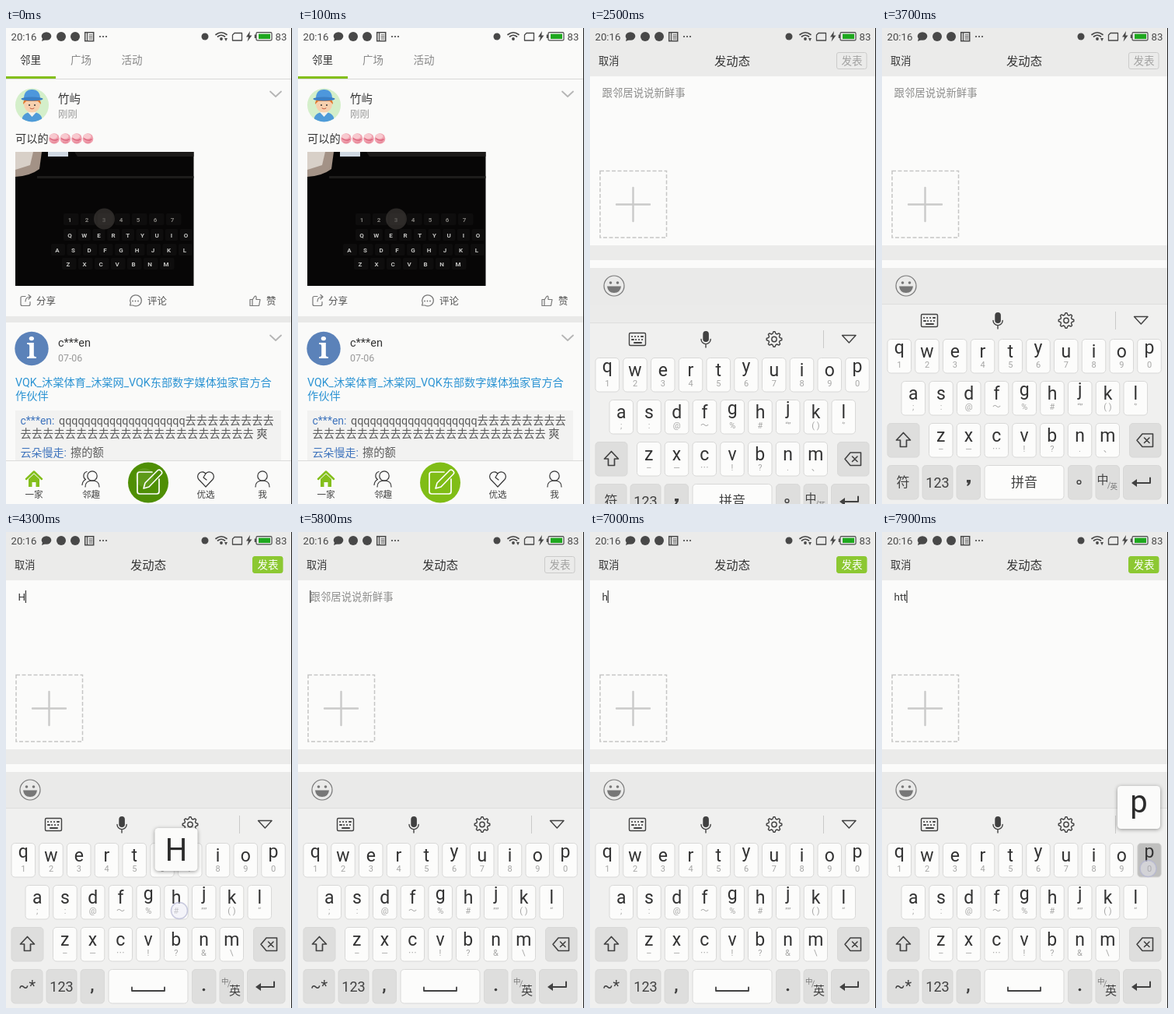
An HTML page that plays this animation: 368x611 px, repeating every 8000 ms.

```html
<!DOCTYPE html>
<html lang="zh-CN">
<head>
<meta charset="utf-8">
<title>发动态</title>
<style>
  html, body { margin: 0; width: 100%; height: 100%; overflow: hidden; background: #fafaf9; }
  svg { display: block; width: 368px; height: 611px; }
  text { font-family: Roboto, "Noto Sans CJK SC", "Noto Sans CJK", sans-serif; white-space: pre; }
</style>
</head>
<body>
<svg id="stage" viewBox="0 0 368 611"></svg>
<script>
const LOOP = 8000;
const INK = '#333', PAPER = '#fafaf9', GREY = '#ebebea', GREEN = '#84bf1c';
const stage = document.getElementById('stage');
const pen = document.createElement('canvas').getContext('2d');

// Drawing helpers
const text = (x, y, s, size, fill = INK, anchor = 'start', more = '') =>
  `<text x="${x}" y="${y}" font-size="${size}" fill="${fill}" text-anchor="${anchor}" ${more}>${s}</text>`;
const mid = (x, y, s, size, fill, more) => text(x, y, s, size, fill, 'middle', more);
const rect = (x, y, w, h, fill, more = '') =>
  `<rect x="${x}" y="${y}" width="${w}" height="${h}" fill="${fill}" ${more}/>`;
const dot = (x, y, r, fill, more = '') => `<circle cx="${x}" cy="${y}" r="${r}" fill="${fill}" ${more}/>`;
const line = (d, stroke = INK, width = 1.3, fill = 'none') =>
  `<path d="${d}" stroke="${stroke}" stroke-width="${width}" fill="${fill}" stroke-linejoin="round" stroke-linecap="round"/>`;
const shape = (d, fill) => `<path d="${d}" fill="${fill}"/>`;
const ring = (x, y, r, stroke = INK, width = 1.3) => dot(x, y, r, 'none', `stroke="${stroke}" stroke-width="${width}"`);
const measure = (s, size) => {
  pen.font = `${size}px Roboto, sans-serif`;
  return pen.measureText(s);
};
// Glyph whose lowest ink, descender included, rests on the given line
const glyph = (x, bottom, s, size, fill = INK) =>
  mid(x, bottom - Math.max(0, measure(s, size).actualBoundingBoxDescent), s, size, fill);

function statusBar(s) {
  const c = '#484848';
  return text(6.5, 15.5, '20:16', 13.2, c)
    + `<ellipse cx="52" cy="10.5" rx="6.3" ry="5.2" fill="${c}"/>` + shape('M47 13l-1 4 5-2z', c)
    + dot(71, 11, 6, c) + dot(89, 11, 6, c)
    + rect(101.7, 5.7, 11, 11, 'none', `stroke="${c}" stroke-width="1.5"`)
    + line('M104.5 6v10M107 9h4M107 11.5h4M107 14h4', c, 1.2)
    + [121, 125, 129].map(x => dot(x, 11, 1.1, c)).join('')
    + dot(256, 11, 4.5, c)
    + line('M270 8.5q7-5.5 14 0M272.5 11q4.5-3.5 9 0', c, 1.7) + dot(277, 14, 1.9, c)
    + (s.net ? shape('M281 13h4l-2 4z', c) : '')
    + line('M294 6.5h9.5v9.5h-12v-7z', c, 1.3)
    + shape('M314 4l-5 7.5h3l-1.5 6 6-8h-3.2z', c)
    + rect(322, 5.7, 20, 10.2, 'none', `rx="1.5" stroke="${c}" stroke-width="1.2"`)
    + rect(319.8, 8.5, 2, 4.5, c) + rect(325, 7.6, 15, 6.4, '#1fa81f')
    + text(346.5, 15.5, '83', 13.2, c);
}

function photo() {
  const row = (letters, x, y, pitch, ink = '#c4c4c2') => [...letters].map((l, i) =>
    rect(x + i * pitch - 8, y - 11, pitch - 2.5, 15, '#0e0d0d', 'rx="2"')
    + mid(x + i * pitch, y, l, 8, ink, 'font-weight="bold"')).join('');
  return `<clipPath id="frame"><rect x="12" y="159" width="229.5" height="172"/></clipPath><g clip-path="url(#frame)">`
    + rect(12, 159, 230, 172, '#070606')
    + shape('M12 159h34l-3 22q-12 9-31 10z', '#a39286') + shape('M12 159h23l-4 17-19 6z', '#d8d0c8')
    + shape('M54 159h26v6H54z', '#cfd8e2') + shape('M88 159h154v6H92z', '#1d1b1a')
    + shape('M40 190h202v3H40z', '#1d1c1b')
    + row('1234567', 82, 249, 22, '#85837f')
    + row('QWERTYUIO', 82, 269, 18.7) + row('ASDFGHJKL', 66, 288, 20.5) + row('ZXCVBNM', 80, 306, 21)
    + dot(126.5, 245, 13.5, '#44403c', 'opacity=".6"') + '</g>';
}

function boyAvatar() {
  return `<clipPath id="face"><circle cx="33.5" cy="99" r="21.5"/></clipPath><g clip-path="url(#face)">`
    + rect(12, 77, 43, 43, '#d4efca')
    + shape('M20 121q0-13 13.5-13t13.5 13z', '#4f9bd8') + shape('M28 108h11l-5.5 6z', '#f3f3ee')
    + dot(33.5, 98, 10.5, '#f7d0ae') + shape('M22 98q0-9 11.5-9t11.5 9l-4-4H26z', '#e0792e')
    + shape('M23 91q0-12 10.5-12t10.5 12z', '#4d97dc')
    + `<ellipse cx="33.5" cy="91" rx="14" ry="2.6" fill="#3b7fc4"/>`
    + dot(30, 99, 1, INK) + dot(37, 99, 1, INK) + line('M31 103q2.5 2 5 0', '#c0573c', 1) + '</g>';
}

function blossom(x) {
  return dot(x, 142, 6.8, '#f0a0ae') + `<ellipse cx="${x - 1}" cy="139" rx="5" ry="3.2" fill="#f8c9cf"/>`
    + line(`M${x - 5} 142q5 4 9.500 1`, '#dc6a80', 1.6) + line(`M${x - 3} 146.500q3 1.500 6-.5`, '#e48495', 1.2);
}

function feed(s) {
  const g = '#777', blue = '#3f74bd', body = '#5c5c5c';
  const chevron = y => line(`M340 ${y}l7 6.5 7-6.5`, '#b5b5b5', 1.8);
  const person = x => ring(x, 575, 6.2, INK, 1.2) + line(`M${x - 9} 589q0-8 9-8t9 8`, INK, 1.2);
  const tone = s.pressed ? '#4f8f04' : '#80bd16';
  return rect(0, 0, 368, 611, PAPER)
    + text(18, 46, '邻里', 13.5) + text(83, 46, '广场', 13.5, '#888') + text(148.5, 46, '活动', 13.5, '#888')
    + rect(0, 65, 368, 1, '#d9d9d8') + rect(0, 62, 64, 3, GREEN)
    + boyAvatar() + text(67, 96, '竹屿', 14.5) + text(67, 115, '刚刚', 12.4, '#999') + chevron(81.5)
    + text(12, 147, '可以的', 14.2) + [62, 76.5, 91, 105.5].map(blossom).join('')
    + photo()
    + line('M25 344.500h-4q-2 0-2 2v8q0 2 2 2h8q2 0 2-2v-3M25 351q0-6 7-6M29 342.500l3 2.500-3 3', g, 1.2)
    + text(39, 355, '分享', 12.5, '#555')
    + line('M159.500 356l1-3a7.300 7 0 1 1 3 3z', g, 1.2) + [163, 166.5, 170].map(x => dot(x, 350.5, .9, g)).join('')
    + text(182, 355, '评论', 12.5, '#555')
    + line('M314 348.500h3v8h-3zM317 349l3-4.500q2-1 2 1v3h5l-1.500 8H317', g, 1.2) + text(335, 355, '赞', 12.5, '#555')
    + rect(0, 370, 368, 8, '#e9e9e8')
    + dot(33, 411.5, 21.7, '#5b82b9')
    + mid(33, 424, 'i', 37, '#fff', 'style="font-family:\'Noto Serif\',serif;font-weight:bold"')
    + text(67, 409, 'c***en', 14.5) + text(67, 428, '07-06', 12.4, '#999') + chevron(394.5)
    + text(12, 460, 'VQK_沐棠体育_沐棠网_VQK东部数字媒体独家官方合', 14.2, '#2b93d3')
    + text(12, 476.5, '作伙伴', 14.2, '#2b93d3')
    + rect(12, 491, 342, 64, '#f2f2f1')
    + text(18.5, 509, 'c***en:', 14, blue) + text(68, 509, 'q'.repeat(20) + '去'.repeat(8), 14.3, body)
    + text(18.5, 526, '去'.repeat(21) + ' 爽', 14.3, body)
    + text(18.5, 550, '云朵慢走:', 14, blue) + text(83, 550, '擦的额', 14.3, body)
    + rect(0, 555, 368, 56, PAPER) + rect(0, 555, 368, 1, '#dcdcdb')
    + line('M26 579l10-9.500 10 9.500', GREEN, 2.5)
    + shape('M29 579l7-6.500 7 6.500v10h-4.500v-6h-5v6H29z', GREEN)
    + line('M104 569.500a5.500 5.500 0 0 0-1.500 10q-4 2-4.500 7', INK, 1.2) + person(111)
    + line('M257 589l-9-9.500a5.800 5.800 0 0 1 9-7.500a5.800 5.800 0 0 1 9 7.500zM257 572l-3 5 4 3', INK, 1.2) + person(330)
    + [[36, '一家'], [109.5, '邻趣'], [257, '优选'], [330, '我']].map(([x, w]) => mid(x, 603, w, 11.6, '#444')).join('')
    + dot(183, 583.5, 26, tone) + (s.pressed ? dot(178, 577, 12, '#69a228', 'opacity="0.6"') : '')
    + line('M188 570h-16q-3 0-3 3v22q0 3 3 3h22q3 0 3-3v-16', '#fff', 1.7)
    + line('M177 591l2-7 16.500-16.500q2-1 3.500.5l1 1q1.500 2 0 3.500L184 589z', '#fff', 1.6);
}

function compose(s) {
  const active = s.text !== '';
  const caret = 15.7 + measure(s.text, 13.4).width;
  return rect(0, 0, 368, 611, GREY)
    + text(11, 47, '取消', 13.2) + mid(183, 48, '发动态', 15.3)
    + rect(317.5, 31.5, 38.5, 21, active ? '#8cc832' : 'none', `rx="2.5" stroke="${active ? '#8cc832' : '#cbcbca'}"`)
    + mid(337, 47, '发表', 13.5, active ? '#fff' : '#a2a2a1')
    + rect(0, 62, 368, 217, '#fbfbfa')
    + text(15.5, 88, s.text || '跟邻居说说新鲜事', 13.4, active ? INK : '#8d8d8c')
    + (s.caret ? rect(caret - .5, 75, 1.3, 16, '#444') : '')
    + rect(13, 183.5, 85.5, 85.5, 'none', 'stroke="#c6c6c5" stroke-width="1.5" stroke-dasharray="5 2.5"')
    + line('M34 226.500h43M55.500 205v43', '#cacac9', 2.4)
    + rect(0, 298, 368, 41, '#fbfbfa') + ring(26, 318.5, 8.3, '#c9c9c8', 1.2)
    + text(44, 324, '仅对本社区可见', 15.3)
    + (s.emoji ? emojiBar() : '')
    + (s.board < 260 ? `<g transform="translate(0 ${s.board})">${keyboard(s)}</g>` : '');
}

function emojiBar() {
  const c = '#777';
  return rect(0, 308, 368, 47, '#eaeae9') + ring(31, 331, 13, c, 1.2)
    + dot(26.5, 327, 1.8, c) + dot(35.5, 327, 1.8, c) + shape('M22 331.500h18q-1 8.500-9 8.500t-9-8.500z', c);
}

// Keyboard geometry
const PITCH = 35.75, KEY_W = 30.5, KEY_H = 43.5;
const ROWS = [
  { keys: 'qwertyuiop', x: 7, y: 399.5, cn: [...'1234567890'] },
  { keys: 'asdfghjkl', x: 25, y: 453.5, cn: [...';:@～%#', '“”', '( )', '‘’'], en: [...';:@～%#', '””', '( )', '‘‘'] },
  { keys: 'zxcvbnm', x: 60.5, y: 507.5, cn: [...'–—⋯!?.、'], en: [...'–—⋯!?&\\'] },
];
const keyBox = letter => {
  const row = ROWS.find(r => r.keys.includes(letter));
  return { x: row.x + row.keys.indexOf(letter) * PITCH, y: row.y };
};

function keyboard(s) {
  const c = '#414141', en = s.lang === 'en';
  const cap = (id, x, y, w, fn) =>
    rect(x, y, w, KEY_H, s.press === id ? '#bfbfbe' : fn ? '#dededd' : '#fcfcfb', 'rx="4.5" stroke="#d8d8d7"');
  let out = rect(0, 354.5, 368, 257, '#f0f0ef') + rect(0, 354, 368, 1, '#dededd')
    + rect(50.5, 367.5, 21, 16, 'none', `rx="1.5" stroke="${c}" stroke-width="1.4"`)
    + line('M54 372h.1M58 372h.1M62 372h.1M66 372h2M54 376h2M59 376h.1M63 376h.1M67 376h.1M57 380h9', c, 2)
    + rect(145.3, 365, 7.6, 14, c, 'rx="3.8"') + line('M143 375.500a6 6 0 0 0 12.200 0M149 382v4', c, 1.4)
    + gear(237, 375.5, c) + rect(300, 364, 1, 23, '#c9c9c8') + line('M324.500 370.500h17.500l-8.700 9.500z', c, 1.4);

  for (const row of ROWS) {
    [...row.keys].forEach((k, i) => {
      const x = row.x + i * PITCH, cx = x + KEY_W / 2;
      out += cap(k, x, row.y, KEY_W) + glyph(cx, row.y + 23.8, s.upper ? k.toUpperCase() : k, 23)
        + mid(cx, row.y + 36.5, (en && row.en || row.cn)[i], 11, s.press === k ? '#777' : '#a6a6a5');
    });
  }

  out += cap('shift', 7, 507.5, 41, true)
    + line('M27.500 519.500l9 9.500h-5v8.500h-8V529h-5z', c, 1.7, s.upper ? c : 'none')
    + cap('del', 318.5, 507.5, 40.5, true)
    + line('M335 521h13.500v16.500H335l-7-8.200zM337.500 526l6.500 6.500M344 526l-6.500 6.500', c, 1.6)
    + cap('sym', 7, 561.5, 40, true) + mid(27, en ? 590 : 589, en ? '~*' : '符', en ? 20 : 17, c)
    + cap('num', 52, 561.5, 39, true) + mid(71.5, 590, '123', 18, c)
    + cap('comma', 96, 561.5, 30.5, true)
    + (en ? mid(111, 589, ',', 22, c, 'font-weight="bold"') : shape('M109 580h5q1 5-4 8l-1-1q2-2 1.500-3.500h-1.500z', c))
    + cap('space', 132, 561.5, 102)
    + (en ? line('M162 584.500v4.500h42v-4.500', c, 1.8) : mid(183, 589, '拼音', 17, c))
    + cap('stop', 239.5, 561.5, 30.5, true)
    + (en ? dot(254.5, 587.5, 1.8, c) : ring(253.5, 583, 2.4, c, 1.4))
    + cap('lang', 275, 561.5, 30.5, true)
    + (en ? text(277, 579.5, '中', 9.5, '#777') + text(287, 594, '英', 15, c) + line('M285.500 584l3-8', '#888', .9)
          : text(276.5, 585, '中', 15, c) + text(293.5, 592, '英', 9.5, '#777') + line('M290.500 591l3-8', '#888', .9))
    + cap('enter', 310.5, 561.5, 48.5, true)
    + line('M345 577.500v6.500H325', c, 2) + shape('M321 584l7-5v10z', c);

  if (s.popup) {
    const { x, y } = keyBox(s.popup.toLowerCase());
    const left = Math.min(x + KEY_W / 2 - 27.5, 303);
    out += rect(left, y - 73.5, 55, 55, '#fbfbfa', 'rx="4.5" style="filter:drop-shadow(0 1px 2.5px #0006)"')
      + glyph(left + 27.5, y - 31.5, s.popup, 40, '#2b2b2b');
  }
  return out;
}

function gear(x, y, c) {
  const pts = Array.from({ length: 32 }, (_, i) => {
    const a = (i - 1.5) * Math.PI / 16, r = i % 4 === 1 || i % 4 === 2 ? 9.8 : 7.4;
    return `${(x + r * Math.cos(a)).toFixed(1)} ${(y + r * Math.sin(a)).toFixed(1)}`;
  });
  return line(`M${pts.join('L')}z`, c, 1.4) + ring(x, y, 3.2, c, 1.4);
}

// Timeline: each step overrides part of the state from its time on
const START = { screen: feed, pressed: true, net: true, text: '', caret: false, emoji: false,
  board: 260, lang: 'cn', upper: false, press: null, popup: null, touch: null };
const DEL = [340, 530], T_KEY = [160, 417], H_KEY = [223, 486];
const hit = (press, touch, popup = null) => ({ press, touch, popup });
const typed = value => ({ text: value, press: null, caret: true });
const lift = { press: null, popup: null, touch: null };
const STEPS = [
  [100, { pressed: false, net: false }],
  [2000, { screen: compose, net: true }],
  [2300, { touch: [46, 107] }],
  [2400, { board: 150 }],
  [2500, { board: 24, emoji: true, touch: null }],
  [2600, { board: 0 }],
  [2800, { caret: true, net: false }],
  [3300, { caret: false }],
  [3700, { net: true }],
  [3800, { ...hit('lang', [290, 585]), caret: true }],
  [3900, { lang: 'en', upper: true }],
  [4000, lift],
  [4200, hit('h', H_KEY, 'H')],
  [4300, { ...typed('H'), upper: false }],
  [4400, lift],
  [4600, { net: false }],
  [4800, { ...hit('del', DEL), text: '' }],
  [4900, { upper: true }],
  [5000, lift],
  [5300, { caret: false }],
  [5500, { ...hit('shift', [28, 532]), net: true }],
  [5600, { upper: false }],
  [5700, { press: null }],
  [5800, { touch: null, caret: true }],
  [6100, hit('h', H_KEY, 'h')],
  [6200, typed('h')],
  [6300, lift],
  [6400, hit('r', [132, 416], 'r')],
  [6500, typed('hr')],
  [6600, lift],
  [6800, hit('del', DEL)],
  [6900, typed('h')],
  [7000, lift],
  [7100, hit('t', T_KEY, 't')],
  [7200, { ...typed('ht'), ...lift }],
  [7400, hit('t', T_KEY, 't')],
  [7500, typed('htt')],
  [7600, { popup: null }],
  [7700, { touch: null }],
  [7900, hit('p', [342.5, 432], 'p')],
];

function render(s) {
  const touch = s.touch
    ? dot(...s.touch, 10.5, '#ececf6', 'fill-opacity=".45" stroke="#b4b5d2" stroke-opacity=".7" stroke-width="1.5"') : '';
  stage.innerHTML = s.screen(s) + statusBar(s) + touch + rect(367, 0, 1, 611, '#222');
}

const begin = performance.now();
let shown = -1;
function tick() {
  const t = (performance.now() - begin) % LOOP;
  const count = STEPS.filter(([at]) => at <= t).length;
  if (count !== shown) {
    shown = count;
    render(Object.assign({}, START, ...STEPS.slice(0, count).map(step => step[1])));
  }
  requestAnimationFrame(tick);
}
tick();
</script>
</body>
</html>
```
